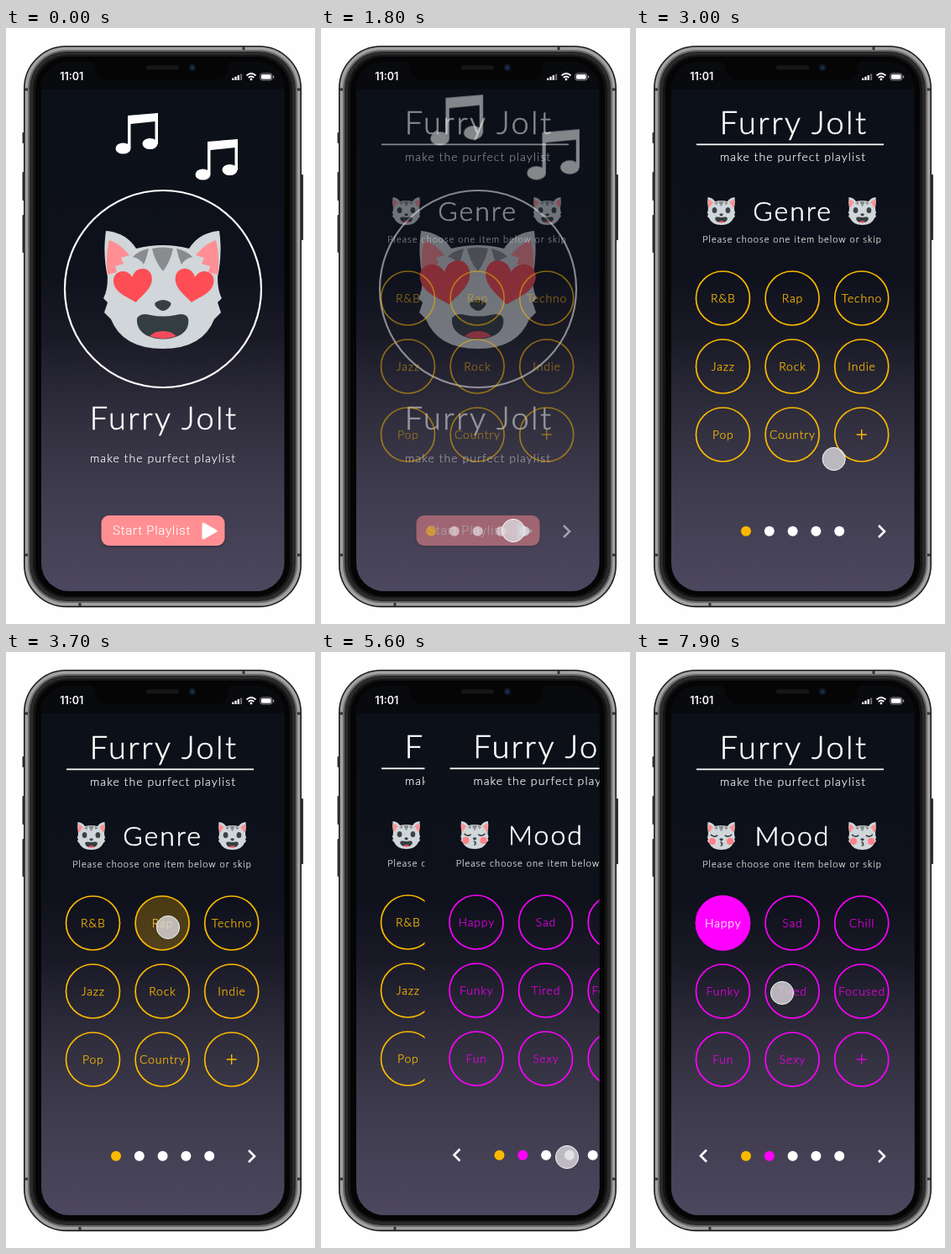
An HTML page that plays this animation: 368 px wide and 708 px high, repeating every 8000 ms.

```html
<!DOCTYPE html>
<html lang="en">
<head>
<meta charset="utf-8">
<title>Playlist app</title>
<style>
html, body { margin: 0; width: 100%; height: 100%; overflow: hidden; background: #fefefe; }
svg { display: block; width: 100vw; height: 100vh; }
text { font-family: Lato, "Open Sans", sans-serif; font-weight: 300; fill: #fff; text-anchor: middle; }
.title { font-size: 38px; letter-spacing: 2.4px; stroke: #fff; stroke-width: .6px; }
.sub { font-size: 14px; letter-spacing: 1.05px; stroke: #fff; stroke-width: .2px; }
.head { font-size: 32px; letter-spacing: 2px; stroke: #fff; stroke-width: .6px; }
.hint { font-size: 11px; letter-spacing: 1px; stroke: #fff; stroke-width: .15px; }
.item { font-size: 14px; letter-spacing: .8px; stroke-width: .25px; }
.start { font: 300 15px Roboto, sans-serif; letter-spacing: .75px; stroke: #fff; stroke-width: .15px; }
.clock { font: 600 12.5px Inter, sans-serif; text-anchor: start; }
.button { filter: drop-shadow(0 1px 1.5px rgba(0, 0, 0, .4)); }
</style>
</head>
<body>
<svg id="stage" viewBox="0 0 368 708"></svg>
<script>
const APP = 'Furry Jolt', SLOGAN = 'make the purfect playlist';
const YELLOW = '#fbb900', MAGENTA = '#f0f';
const stage = document.getElementById('stage');
const text = (x, y, cls, s, more = '') => `<text x="${x}" y="${y}" class="${cls}" ${more}>${s.replace('&', '&amp;')}</text>`;
const rect = (x, y, w, h, r, fill, more = '') => `<rect x="${x}" y="${y}" width="${w}" height="${h}" rx="${r}" fill="${fill}" ${more}/>`;
const circle = (x, y, r, fill, more = '') => `<circle cx="${x}" cy="${y}" r="${r}" fill="${fill}" ${more}/>`;
const path = (d, fill, more = '') => `<path d="${d}" fill="${fill}" ${more}/>`;
const line = (d, color, w) => path(d, 'none', `stroke="${color}" stroke-width="${w}"`);
const mirror = s => s + `<g transform="matrix(-1 0 0 1 373 0)">${s}</g>`;

// Cat face in the coordinates of the large portrait, centred on x = 186.5
const HEART = 'M0 19C-8 12-23 5-23-8C-23-22-5-24 0-11C5-24 23-22 23-8C23 5 8 12 0 19Z';
const FACES = {
  love: `<g id="heartL">${path(HEART, '#ff4d55')}</g><g id="heartR">${path(HEART, '#ff4d55')}</g>`,
  grin: mirror('<ellipse cx="153" cy="307" rx="12" ry="15" fill="#3b4347"/>'),
  kiss: mirror(line('M134 304Q149 322 168 308', '#3b4347', 7) + circle(142, 338, 17, '#ff8088'))
};
const MOUTH = path('M156 345Q160 338 172 341Q187 344 202 341Q214 338 217 345Q219 358 207 365Q187 374 167 365Q155 358 156 345Z', '#343e41') +
  path('M171 366Q177 360 187 360Q197 360 203 366Q187 372 171 366Z', '#f24b5c');
const KISS = line('M181 342Q197 345 188 351Q198 357 183 361', '#3b4347', 6);
const cat = face =>
  path('M119 241Q143 243 155 262Q187 254 218 262Q230 243 254 241Q258 268 252 296Q252 312 257 321L252 326L256 338L248 346Q234 381 187 381Q139 381 125 346L117 338L121 326L116 321Q121 312 121 296Q115 268 119 241Z', '#d0d6d9') +
  mirror(path('M123 252Q137 257 147 270L137 273L140 280L130 283L132 290L121 293Q118 270 123 252Z', '#ff8f94') +
    path('M170 262Q157 265 151 272Q160 274 164 281Q168 272 170 262Z', '#898c8f')) +
  path('M174 262Q187 259 199 262Q196 277 187 289Q177 277 174 262Z', '#898c8f') +
  FACES[face] +
  path('M178 326Q187 320 196 326Q198 329 192 334Q187 338 182 334Q175 329 178 326Z', '#383f43') +
  (face === 'kiss' ? KISS : MOUTH);
const smallCat = (x, face) => `<g transform="translate(${x} 217.5) scale(.237) translate(-186.5 -311)">${cat(face)}</g>`;

const note = id => `<g id="${id}" fill="#fff"><ellipse cx="8.5" cy="-7" rx="9" ry="6.6"/><ellipse cx="40.5" cy="-12.5" rx="9" ry="6.6"/>` +
  path('M14-46L50-49V-12H46.5V-39L17.5-36V-7H14Z', '#fff') + '</g>';

const welcome = note('noteA') + note('noteB') +
  circle(187, 310, 117, 'none', 'stroke="#fff" stroke-width="2.2"') + cat('love') +
  text(188, 477, 'title', APP) + text(187, 516, 'sub', SLOGAN) +
  rect(113.5, 579, 147, 36, 9, '#ff8f92', 'class="button"') +
  text(173.5, 602, 'start', 'Start Playlist') +
  path('M235 589L250 597.5L235 606Z', '#fff', 'stroke="#fff" stroke-width="3" stroke-linejoin="round"');

// A chooser page; the picked item has a filled overlay that fades in
function chooser(name, face, color, ink, items, pick, dots, back) {
  const grid = items.map((s, i) => {
    const x = 103.5 + i % 3 * 82.6, y = 321 + (i / 3 | 0) * 81;
    const label = fill => s === '+' ? line(`M${x - 6} ${y}h12M${x} ${y - 6}v12`, fill, 1.4)
      : text(x + .3, y + 5, 'item', s, `style="fill:${fill};stroke:${fill}"`);
    return circle(x, y, 32, 'none', `stroke="${color}" stroke-width="1.7"`) + label(ink) +
      (i === pick ? `<g id="pick${name}">${circle(x, y, 32.8, color)}${label('#fff')}</g>` : '');
  }).join('');
  return text(188, 126, 'title', APP) + line('M72 138.4H295', '#fff', 1.6) + text(187, 158, 'sub', SLOGAN) +
    smallCat(101.5, face) + smallCat(269.5, face) + text(186.5, 229, 'head', name) +
    text(186, 255, 'hint', 'Please choose one item below or skip') + grid +
    [0, 1, 2, 3, 4].map(i => circle(131 + i * 27.8, 597.8, 6, dots[i] || '#fff')).join('') +
    line('M289 591l7 7l-7 7', '#fff', 2.6) + (back ? line('M84 590.5l-7 7l7 7', '#fff', 2.6) : '');
}
const genre = chooser('Genre', 'grin', YELLOW, YELLOW,
  ['R&B', 'Rap', 'Techno', 'Jazz', 'Rock', 'Indie', 'Pop', 'Country', '+'], 1, [YELLOW], false);
const mood = chooser('Mood', 'kiss', MAGENTA, '#e000e0',
  ['Happy', 'Sad', 'Chill', 'Funky', 'Tired', 'Focused', 'Fun', 'Sexy', '+'], 0, [YELLOW, MAGENTA], true);

const backdrop = rect(42, 40, 290, 630, 0, 'url(#night)') + rect(42, 40, 290, 33, 0, '#090a0e');
const status = text(64.2, 62, 'clock', '11:01') +
  [0, 1, 2, 3].map(i => rect(269 + i * 3.3, 59.5 - i * 1.7, 2.3, 2.5 + i * 1.7, .6, '#fff', i === 3 ? 'opacity=".4"' : '')).join('') +
  line('M286.5 56.5Q292 51.5 297.5 56.5M288.7 59Q292 56 295.3 59', '#fff', 1.7) + circle(292, 61, 1.4, '#fff') +
  rect(302.8, 54, 14, 8, 2.4, 'none', 'stroke="#aaa" stroke-width=".8"') + rect(304, 55.2, 11.6, 5.6, 1.4, '#fff') +
  rect(318, 56.5, 1.2, 3, .6, '#aaa');

const frame = [[19.5, 124, 13], [19.5, 171, 34], [19.5, 222, 45], [350.5, 174, 78]]
    .map(([x, y, h]) => rect(x, y, 3.5, h, 1, '#333')).join('') +
  rect(21.8, 21.8, 329.4, 665.6, 50, '#a3a0a1', 'stroke="#1c1c1c" stroke-width="1.6"') +
  line('M22 73h6M22 626h6M345 73h6M345 626h6M283 22v5M88 682v5', '#333', 3) +
  rect(26, 26, 321, 657, 46, '#6a6869') + rect(28, 28, 317, 653, 44, '#2b2a2b') +
  rect(32, 32, 309, 645, 41, '#141414') + rect(35, 34, 303, 641, 39, '#050506');
const notch = path('M98 39Q106 40 106 46Q107 62 123 62H248Q264 62 264 46Q264 40 272 39Z', '#050506') +
  rect(167, 44.5, 39, 5, 2.5, '#17171a') + circle(222, 47, 4, '#0e1a29') + circle(222, 47, 1.6, '#1c3f5c');

stage.innerHTML = `<defs>
  <linearGradient id="night" gradientUnits="userSpaceOnUse" x1="0" y1="40" x2="0" y2="669">
    <stop offset="0" stop-color="#0b1018"/><stop offset=".4" stop-color="#0e111b"/>
    <stop offset=".52" stop-color="#1a1a27"/><stop offset=".66" stop-color="#2f2d3c"/>
    <stop offset=".82" stop-color="#403c4f"/><stop offset="1" stop-color="#4c475e"/></linearGradient>
  <clipPath id="screen">${rect(42, 40, 289.5, 629, 33, '#000')}</clipPath>
  <clipPath id="bar">${rect(42, 40, 290, 33, 0, '#000', 'id="barBox"')}</clipPath></defs>
  ${frame}<g clip-path="url(#screen)">${backdrop}<g id="welcome">${welcome}</g><g id="genre">${genre}</g>
  <g id="mood">${backdrop}<g id="moodBody">${mood}</g></g><g clip-path="url(#bar)">${status}</g></g>${notch}
  <g id="touch">${circle(0, 0, 13.6, '#dcdadd', 'fill-opacity=".8" stroke="#f2f2f2" stroke-width="1"')}</g>`;

const el = id => document.getElementById(id);
const set = (id, key, v) => el(id).setAttribute(key, v);
const place = (id, x, y, more = '') => set(id, 'transform', `translate(${x} ${y}) ${more}`);
const ramp = (t, start, length) => Math.min(1, Math.max(0, (t - start) / length));
const smooth = u => u * u * (3 - 2 * u);

// Touch path: time, x, y
const TOUCH = [[100, 345, 635], [900, 218, 594], [1150, 229, 597], [2300, 229, 597], [2800, 289, 598],
  [3350, 113, 314], [3650, 193, 327], [4300, 193, 327], [5200, 293, 600], [5850, 293, 600],
  [6600, 114, 339], [6750, 109, 334], [7450, 109, 334], [7900, 174, 405], [8400, 246, 484]];
function touchAt(t) {
  const i = Math.max(1, TOUCH.findIndex(p => p[0] > t));
  const [a, b] = [TOUCH[i - 1], TOUCH[i]];
  const u = smooth(ramp(t, a[0], b[0] - a[0]));
  return [a[1] + (b[1] - a[1]) * u, a[2] + (b[2] - a[2]) * u];
}

function draw(t) {
  const beat = (1 - Math.cos(t / 1200 * 2 * Math.PI)) / 2;
  const grow = `scale(${1 + .24 * beat})`, love = `scale(${1 + .3 * beat})`;
  place('noteA', 131, 150 - 10 * beat, grow);
  place('noteB', 226 + 20 * beat, 181, grow);
  place('heartL', 152 - 3 * beat, 307 - 3 * beat, love + 'rotate(-8)');
  place('heartR', 223.5 + beat, 307 - 3 * beat, love + 'rotate(8)');

  const fade = ramp(t, 1600, 400);
  set('welcome', 'opacity', 1 - fade);
  set('genre', 'opacity', fade);
  set('pickGenre', 'opacity', ramp(t, 3600, 400));
  set('pickMood', 'opacity', ramp(t, 6900, 400));
  place('genre', 0, t >= 3650 && t < 5400 ? 1 : 0);
  place('moodBody', 0, t >= 6950 ? 1 : 0);

  const shift = 290 * (1 - ramp(t, 5413, 400)) ** 2;
  place('mood', shift, 0);
  set('barBox', 'width', shift > 0 ? shift : 290);

  set('touch', 'visibility', t < 80 ? 'hidden' : 'visible');
  place('touch', ...touchAt(t));
}

const begin = performance.now();
function tick() {
  draw((performance.now() - begin) % 8000);
  requestAnimationFrame(tick);
}
tick();
</script>
</body>
</html>
```
